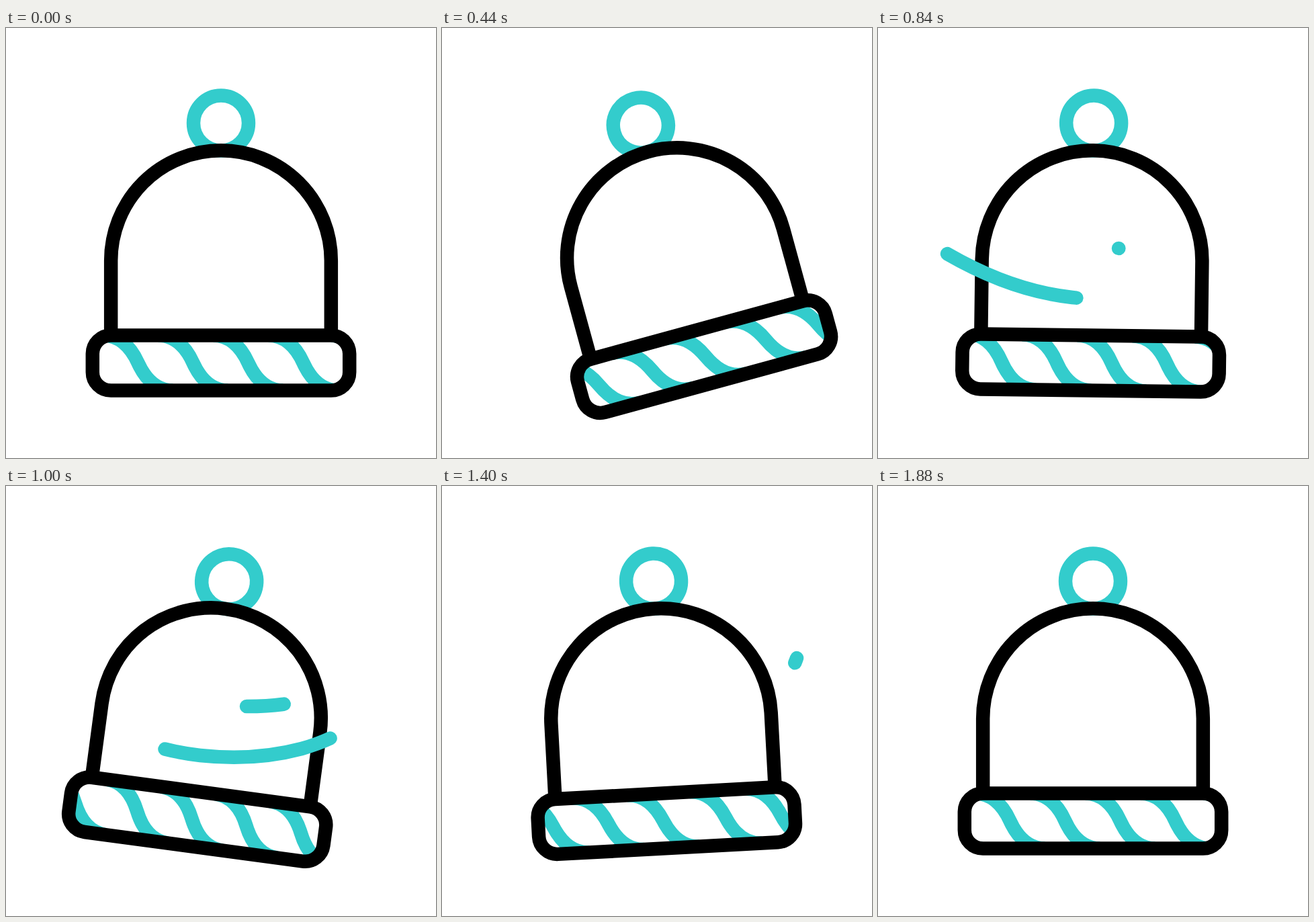
Animation of 640x640 px, one loop 2400 ms. Source, as an HTML page:

```html
<!DOCTYPE html>
<html lang="en">
<head>
<meta charset="utf-8">
<title>Winter hat</title>
<style>
  html, body { margin: 0; width: 100%; height: 100%; overflow: hidden; background: #fff; }
  svg { display: block; width: 100%; height: 100%; }
  .line { fill: none; stroke: #000; stroke-width: 20.48; }
  .teal { stroke: #33cccc; }
  .wind { stroke-linecap: round; }
</style>
</head>
<body>
<svg viewBox="0 0 640 640">
  <defs>
    <clipPath id="inside"><rect x="128.8" y="457.5" width="382.4" height="82" rx="27.3"/></clipPath>
    <path id="stripe" d="M-52-41C-30.5-41-12.5-27.5 0 0S30.5 41 52 41"/>
  </defs>
  <g id="hat">
    <circle class="line teal" cx="320" cy="141.4" r="41"/>
    <path class="line" d="M156.16 457.5V346.2a163.84 163.84 0 0 1 327.68 0V457.5"/>
    <g clip-path="url(#inside)"><g id="stripes" class="line teal"></g></g>
    <rect class="line" x="128.8" y="457.5" width="382.4" height="82" rx="27.3"/>
  </g>
  <path id="low" class="line teal wind" d="M96 332C160 370 225 394 289 401C345 407 395 403 440 391C485 378 520 359 539 334"/>
  <path id="high" class="line teal wind" d="M358 328C376 328 394 327.5 411 325C446 320 478 312 500 295C512 286 523 272 528 256"/>
</svg>
<script>
  const LOOP = 2400;
  const $ = id => document.getElementById(id);
  const hat = $("hat"), stripes = $("stripes");

  // [time in ms, value]
  const swing = [[0, 0], [577, -17.8], [980, 7.75], [1335, -4.05], [1600, 2.15], [1870, 0]];
  const slide = [[0, 0], [577, -140], [970, 35], [1464, -135], [1870, 0]];
  const gusts = [
    { path: $("low"), head: [[585, 0], [1135, 1]], tail: [[800, 0], [1330, 1]] },
    { path: $("high"), head: [[828, 0], [1320, 1]], tail: [[1008, 0], [1455, 1]] }
  ];

  const ease = p => p * p * (3 - 2 * p);

  function valueAt(keys, t) {
    if (t <= keys[0][0]) return keys[0][1];
    for (let i = 1; i < keys.length; i++) {
      const [t0, a] = keys[i - 1], [t1, b] = keys[i];
      if (t < t1) return a + (b - a) * ease((t - t0) / (t1 - t0));
    }
    return keys[keys.length - 1][1];
  }

  // Groups of four stripes with a slightly wider gap between groups
  for (let group = -1; group <= 1; group++) {
    for (let i = 0; i < 4; i++) {
      const use = document.createElementNS("http://www.w3.org/2000/svg", "use");
      use.setAttribute("href", "#stripe");
      use.setAttribute("x", 196.5 + group * 339 + i * 82);
      use.setAttribute("y", 498.5);
      stripes.append(use);
    }
  }

  function drawGust({ path, head, tail }, t) {
    const a = valueAt(tail, t), b = valueAt(head, t);
    const len = path.getTotalLength();
    path.style.display = b > 0 && a < 1 ? "" : "none";
    path.style.strokeDasharray = `${Math.max((b - a) * len, 0.01)} ${len * 2}`;
    path.style.strokeDashoffset = -a * len;
  }

  function draw(t) {
    hat.setAttribute("transform", `rotate(${valueAt(swing, t)} 320 233)`);
    stripes.setAttribute("transform", `translate(${valueAt(slide, t)} 0)`);
    gusts.forEach(g => drawGust(g, t));
  }

  const start = performance.now();
  function tick() {
    draw((performance.now() - start) % LOOP);
    requestAnimationFrame(tick);
  }
  tick();
</script>
</body>
</html>
```
